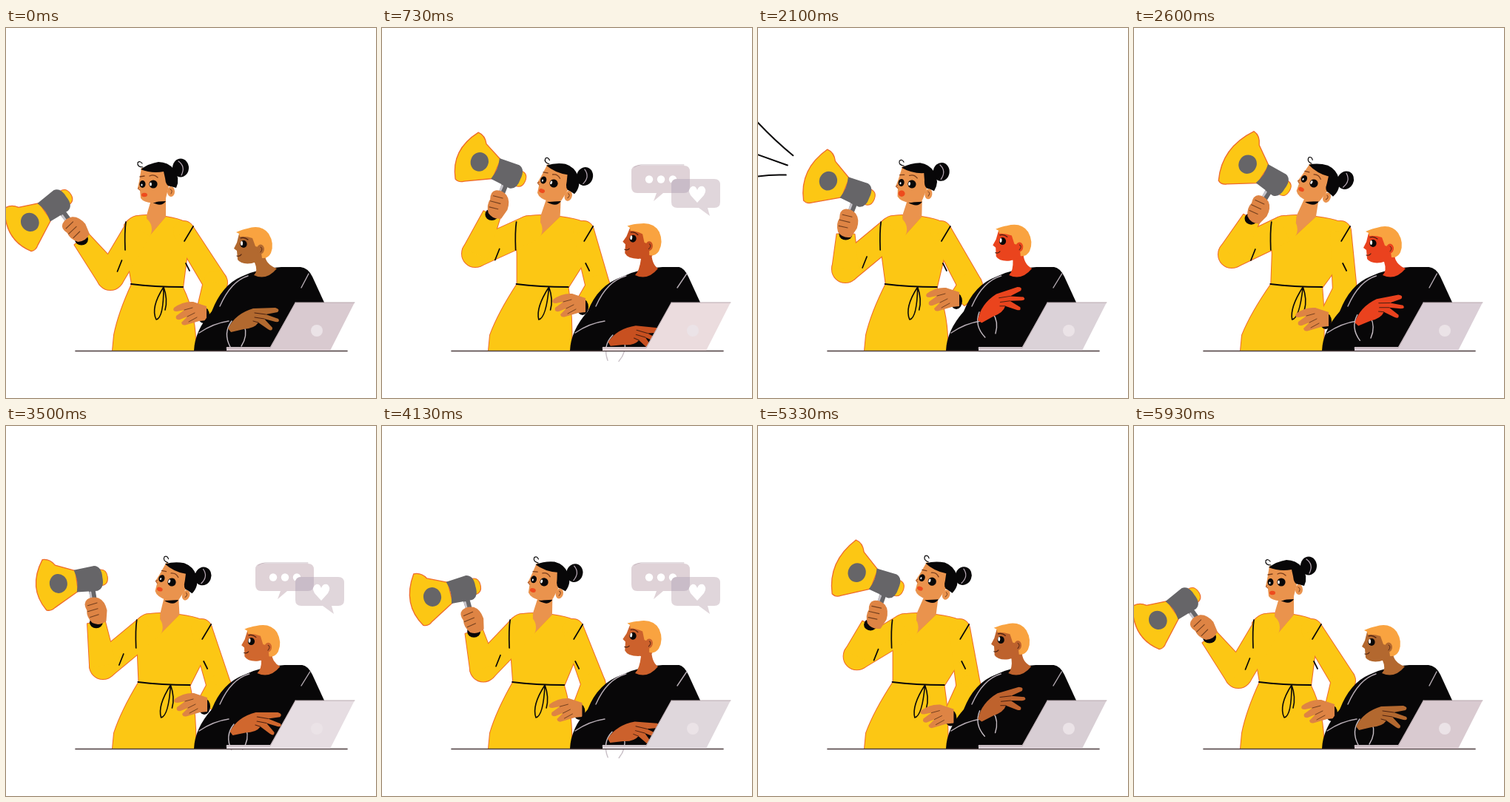
Write an HTML page that moves like this. It is 500 px wide and 500 px high and loops after 6010 ms.

```html
<!DOCTYPE html>
<html lang="en">
<head>
<meta charset="utf-8">
<style>
html, body { margin: 0; width: 100%; height: 100%; overflow: hidden; background: #fff; }
svg { display: block; width: 100vw; height: 100vh; }
</style>
</head>
<body>
<svg id="stage" viewBox="0 0 500 500" fill="none" stroke-linecap="round" stroke-linejoin="round"></svg>
<script>
const LOOP = 6010;
const YELLOW = '#fcc714', GRAY = '#666568', INK = '#080708', EDGE = '#ee6a2c';
const SKIN = '#ea934d', HAND = '#de8444';

const ease = {
  both: u => u * u * (3 - 2 * u),
  in: u => u * u,
  out: u => 1 - (1 - u) * (1 - u),
  flat: u => u
};

// horn x, y, angle, half height | elbow x, y | lean | head x, y, tilt | right hand x, y | right elbow x, y
const LOW   = [20, 271, -35, 35, 141, 336, 0, 199, 211, 0, 249, 385, 283, 344];
const UP    = [118, 175, 23, 36, 126, 305, 28, 232, 210, 18, 253, 374, 292, 350];
const SIDE  = [107, 186, 21, 40, 122, 317, 13, 215, 211, 12, 250, 360, 288, 347];
const LEFT  = [81, 201, 22, 39, 118, 326, 6, 208, 211, 8, 250, 366, 287, 348];
const HIGH  = [141, 176, 33, 42, 132, 306, 34, 243, 210, 25, 241, 393, 285, 355];
const DOWN  = [56, 215, -8, 35, 131, 324, 21, 224, 211, 20, 250, 376, 288, 352];
const LOWER = [35, 247, -24, 35, 138, 332, 12, 214, 211, 12, 250, 381, 286, 348];

const womanKeys = [
  [0, LOW], [670, UP, 'both'], [1270, UP], [1500, SIDE, 'in'], [1850, LEFT, 'out'], [2230, LEFT],
  [2580, HIGH, 'both'], [3160, HIGH], [3500, DOWN, 'in'], [3780, LOWER, 'out'], [3960, LOWER],
  [4600, HIGH, 'both'], [5140, HIGH], [5850, LOW, 'both'], [LOOP, LOW]
];

// head x, y, tilt | hand x, y, turn
const manRest = [0, 0, 0, 334, 393, 0];
const manKeys = [
  [0, manRest], [500, [9, 0, 3, 337, 401, 2], 'both'], [730, [14, -5, 8, 341, 416, 8], 'both'],
  [1250, [14, -6, 8, 340, 413, 6], 'both'], [1500, [13, -5, 7, 335, 392, 0], 'both'],
  [1720, [12, -5, 4, 326, 372, -18], 'both'], [2200, [8, -3, 2, 326, 373, -16], 'both'],
  [2600, [2, -1, 0, 330, 380, -9], 'both'], [2930, manRest, 'both'], [3010, manRest]
];

const toneKeys = [
  [0, [178, 105, 47, 217, 202, 208]], [730, [200, 80, 32, 235, 220, 222], 'flat'],
  [1500, [234, 70, 28, 220, 215, 218], 'flat'], [2600, [234, 66, 30, 218, 206, 214], 'flat'],
  [3500, [208, 103, 46, 230, 221, 226], 'flat'], [4700, [201, 91, 43, 216, 209, 215], 'flat'],
  [LOOP, [178, 105, 47, 217, 202, 208], 'flat']
];

function sample(keys, t) {
  const i = Math.max(1, keys.findIndex(k => k[0] > t));
  const [t0, a] = keys[i - 1], [t1, b, mode = 'both'] = keys[i];
  const u = ease[mode]((t - t0) / (t1 - t0));
  return a.map((v, n) => v + (b[n] - v) * u);
}

const ramp = (t, from, to) => Math.min(1, Math.max(0, (t - from) / (to - from)));
const rgb = c => `rgb(${c.map(Math.round)})`;
const shape = (d, fill, extra = '') => `<path d="${d}" fill="${fill}" ${extra}/>`;
const line = (d, color = INK, w = 1.7) => `<path d="${d}" stroke="${color}" stroke-width="${w}"/>`;
const oval = (x, y, rx, ry, fill) => `<ellipse cx="${x}" cy="${y}" rx="${rx}" ry="${ry}" fill="${fill}"/>`;
const group = (transform, body) => `<g transform="${transform}">${body}</g>`;
const spin = (x, y, deg) => {
  const a = deg * Math.PI / 180, c = Math.cos(a), s = Math.sin(a);
  return [x * c - y * s, x * s + y * c];
};

const disc = (x, y, r) => `M${x - r} ${y}a${r} ${r} 0 1 0 ${2 * r} 0a${r} ${r} 0 1 0 ${-2 * r} 0Z`;
function taper([x0, y0, r0], [x1, y1, r1]) {
  const len = Math.hypot(x1 - x0, y1 - y0), nx = (y0 - y1) / len, ny = (x1 - x0) / len;
  return `M${x0 + nx * r0} ${y0 + ny * r0}L${x1 + nx * r1} ${y1 + ny * r1}` +
    `L${x1 - nx * r1} ${y1 - ny * r1}L${x0 - nx * r0} ${y0 - ny * r0}Z`;
}
const limb = (a, b, c) => [disc(...a), taper(a, b), disc(...b), taper(b, c)];

function shout(t) {
  const start = [760, 1950, 2640, 4600].find(s => t >= s && t < s + (s === 1950 ? 330 : 500));
  if (start === undefined) return '';
  const u = (t - start) / (start === 1950 ? 330 : 500);
  const outer = 0.3 + 0.9 * ease.out(ramp(u, 0, .45)), inner = 1.15 * ease.in(ramp(u, .45, 1));
  return [[-42, -14, -58, -23, 3], [-44, 1, -71, 3, 0], [-41, 14, -59, 34, -8]].map(([x, y, dx, dy, bend]) => {
    const m = (inner + outer) / 2;
    return line(`M${x + dx * inner} ${y + dy * inner}Q${x + dx * m} ${y + dy * m + bend} ${x + dx * outer} ${y + dy * outer}`, INK, 2);
  }).join('');
}

function megaphone(x, y, angle, h, t) {
  const bell = `M-2 ${-h}Q8 ${-h} 14 ${-h * .72}L40 -14V14L6 ${h * .9}Q0 ${h + 1} -6 ${h * .95}Q-27 0 -2 ${-h}Z`;
  return group(`translate(${x} ${y}) rotate(${angle})`,
    shape('M54 12H63L64 57H57Z', GRAY) + line('M56 18V40', '#c5c2c8', 3) +
    shape('M72 -11Q82 -11 82 0Q82 11 72 11Z', YELLOW, `stroke="${EDGE}"`) +
    shape(bell, YELLOW, `stroke="${EDGE}" stroke-width="1.3"`) +
    shape('M38 -15L66 -17Q76 -15 75 0Q76 15 66 17L38 15Q43 0 38 -15Z', GRAY) +
    oval(15, 0, 12, 13, GRAY) + shout(t) +
    shape('M50 27Q57 23 66 27Q74 32 75 45L72 59Q62 65 53 59Q46 50 48 41Q44 31 50 27Z', HAND) +
    line('M50 35L63 33M49 43L63 41M51 51L63 49', '#74401f', 1.1));
}

function womanHead(x, y, tilt, t) {
  const blink = t > 4640 && t < 4800, loud = shout(t) !== '';
  const eyes = blink
    ? line('M-18 1Q-15 4 -11 1M-6 1Q0 5 6 0', INK, 2)
    : oval(-14.5, 0, 4, 5, INK) + oval(0, 0, 5.6, 5.6, INK) + oval(-15.5, 1, 1, 1.5, '#fff') + oval(-3.5, 0, 1.4, 2.5, '#fff');
  return group(`translate(${x} ${y}) rotate(${tilt})`,
    oval(37, -22, 11, 12.5, INK) + line('M34 -31Q44 -24 38 -12', '#b8a9b6', 1.2) +
    shape('M-16 -22L-19 -4L-21 5L-18 9L-17 19Q-12 26 2 25L17 19L23 -6L16 -22Z', SKIN) +
    oval(24, 10, 5, 7, SKIN) + line('M23 7Q27 8 24 13', '#7c421f', 1) +
    shape('M-17 -20Q-6 -28 7 -30Q20 -30 28 -20Q37 -8 31 5L24 3Q17 4 16 -8L14 -17Q-2 -14 -17 -20Z', INK) +
    line('M-14 -23Q-22 -23 -21 -29Q-18 -32 -15 -28', INK, 1.2) +
    line('M-18 -10L-12 -11M-5 -11Q1 -14 6 -9', '#7a3e1c', 1.3) +
    eyes + line('M-19 4L-21 6L-18 8', '#a95628', 1) +
    oval(-12, 14.5, loud ? 4.5 : 4, loud ? 4.2 : 2.8, '#ee4b1d'));
}

function woman(p, t) {
  const [hx, hy, angle, h, ex, ey, lean, x, y, tilt, rx, ry, qx, qy] = p;
  const sl = 160 + .7 * lean, sr = 252 + 1.15 * lean, w = .45 * lean, c = 203 + .88 * lean, tip = 193 + .7 * lean;
  const [gx, gy] = spin(58, 43, angle), fist = [hx + gx, hy + gy];
  const d = Math.hypot(ex - fist[0], ey - fist[1]);
  const wrist = [fist[0] + (ex - fist[0]) * 16 / d, fist[1] + (ey - fist[1]) * 16 / d];
  const cuff = [rx + 20, ry + 1];
  const torso = `M${c - 13} 253Q${sl + 8} 253 ${sl} 266L${sl + 3} 305L${170 + w} 346Q${152 + w * .4} 385 146 415L144 436H256` +
    `Q258 390 ${239 + w} 351L${sr - 8} 312L${sr} 274Q${sr - 2} 260 ${c + 13} 255L${tip} 282Z`;
  const cloth = [torso,
    ...limb([sl + 19, 272, 18], [ex, ey, 18], [...wrist, 12]),
    ...limb([sr - 12, 275, 14], [qx, qy, 16], [...cuff, 12])];
  const [nx, ny] = spin(7, 22, tilt);
  const midX = (sl + 10 + ex) / 2, midY = (272 + ey) / 2;
  return cloth.map(s => shape(s, YELLOW, `stroke="${EDGE}" stroke-width="2"`)).join('') +
    shape(`M${x + nx - 9} ${y + ny - 4}L${x + nx + 10} ${y + ny - 5}L${c + 13} 255L${tip} 282L${c - 13} 253Z`, SKIN) +
    cloth.map(s => shape(s, YELLOW)).join('') +
    shape(`M${x + nx - 9} ${y + ny + 2}L${x + nx + 10} ${y + ny + 1}Q${x + nx + 4} ${y + ny + 10} ${x + nx - 9} ${y + ny + 2}Z`, INK) +
    womanHead(x, y, tilt, t) +
    line(`M${sl + 2} 262Q${sl} 275 ${sl + 1} 300M${sr + 1} 268L${sr - 11} 288`) +
    line(`M${midX + 1} ${midY + 10}L${midX - 5} ${midY + 25}`) +
    line(`M${sr - 9} 318L${sr - 4} 328`) +
    line(`M${169 + w} 346Q${200 + w} 350 ${239 + w} 350`, INK, 2) +
    line(`M${213 + w} 350Q${195 + w} 378 ${203 + w * .7} 394Q${213 + w * .7} 392 ${213 + w} 350Q${219 + w} 367 ${215 + w} 381`, INK, 1.6) +
    oval(wrist[0], wrist[1], 9, 8, INK) +
    megaphone(hx, hy, angle, h, t) +
    oval(cuff[0] - 2, cuff[1] + 2, 8, 11, INK) +
    group(`translate(${rx} ${ry})`,
      shape('M22 -9L4 -15Q-10 -16 -22 -7Q-25 -2 -18 -2L-8 -4L-19 4Q-21 10 -14 9L-4 5L-12 13Q-11 18 -5 16L12 11L22 10Z', HAND) +
      line('M-8 -4L3 -7M-4 5L6 0M-2 12L9 6', '#74401f', 1));
}

function man([hx, hy, tilt, px, py, turn], skin) {
  const k = hx * .5;
  const head =
    shape('M315 278L312 290L308 298L312 301L313 313Q318 320 332 318L350 312L353 282Z', skin) +
    shape('M311 276Q320 272 326 271Q345 265 355 278Q363 291 358 304Q354 312 346 311L344 297L337 295L333 284Q324 281 316 282L315 278Z', '#f9a340') +
    oval(344, 299, 5, 6.5, skin) + line('M344 296Q348 298 344 303', '#5b2b17', 1) +
    oval(321, 292, 4.6, 5, INK) + oval(318.5, 291, 1.5, 3, '#fff') +
    line('M317 284Q322 282 327 286M312 308Q316 309 318 306', '#4a2010', 1.2);
  return shape(`M254 436Q255 409 278 383Q292 347 ${318 + k} 336Q${340 + k} 325 ${372 + k} 323H${398 + k * .5}Q408 324 414 336L431 373L430 436Z`, INK) +
    shape(`M${326 + hx} ${312 + hy}L${350 + hx} ${306 + hy}Q${350 + hx} 319 ${366 + k} 325Q${352 + k} 342 ${335 + k} 334Q${341 + k} 328 ${336 + hx} ${317 + hy}Z`, skin) +
    group(`translate(${hx} ${hy}) rotate(${tilt} 340 320)`, head) +
    line(`M${327 + k * .4} 335Q304 342 289 376M${409 + k * .4} 332L399 351M261 412Q280 399 301 396`, '#b7adb5', 1.4) +
    group(`translate(${px} ${py}) rotate(${turn})`,
      line('M-29 3Q-41 19 -31 38M-12 9Q-7 23 -16 37', '#c7bec5', 1.4) +
      shape('M-34 13Q-24 -7 0 -14L30 -15Q37 -13 33 -9L17 -6L34 0Q37 5 30 4L15 0L26 12Q26 18 20 14L7 5Q2 13 -13 14L-30 18Z', skin) +
      line('M2 -8L17 -6M2 -2L15 0M0 3L7 5', '#4a2010', 1));
}

function bubbles(t) {
  const size = (a, b, c, d) => ease.both(ramp(t, a, b)) * (1 - ease.both(ramp(t, c, d)));
  const one = size(150, 350, 1560, 1760), two = size(250, 450, 1760, 1960);
  const pop = (x, y, s, body) => s > .01 ? group(`translate(${x} ${y}) scale(${s}) translate(${-x} ${-y})`, body) : '';
  return pop(370, 230, one,
      shape('M345 186H408Q416 186 416 194V214Q416 223 408 223H380L367 234L371 223H345Q337 223 337 214V194Q337 186 345 186Z', '#dfd2d7') +
      line('M341 188Q345 185 350 185H408', '#c6b8bf', 1) +
      [361, 377, 393].map(x => oval(x, 204.5, 5.2, 5.2, '#fff')).join('')) +
    pop(430, 235, two,
      shape('M399 204H449Q457 204 457 212V235Q457 243 449 243H440L443 254L428 243H399Q391 243 391 235V212Q391 204 399 204Z', '#e0d6db') +
      (one > .9 ? shape('M399 204H416V214Q416 223 408 223H391V212Q391 204 399 204Z', '#c9bcc8') : '') +
      shape('M426 236L417 226Q412 218 419 214Q424 213 426 219Q428 213 434 214Q440 218 435 226Z', '#fff'));
}

function draw(t) {
  const tone = sample(toneKeys, t), skin = rgb(tone.slice(0, 3)), metal = rgb(tone.slice(3));
  const beat = t % 3000;
  return bubbles(beat) +
    woman(sample(womanKeys, t), t) +
    man(sample(manKeys, beat), skin) +
    line('M94 436.5H461', '#4b3c3e', 1.6) +
    shape('M391 371H471L438 436H298V431H357Z', metal) +
    line('M391 371H471M298 432.5H357L391 371', '#b9a9af', 1) +
    oval(420, 409, 8, 8, '#ebe3e7');
}

const stage = document.getElementById('stage');
const began = performance.now();
function tick() {
  const t = (performance.now() - began) % LOOP;
  // The picture advances in alternating steps of 30 and 70 ms.
  const step = Math.min(5930, Math.floor(t / 100) * 100 + (t % 100 < 30 ? 0 : 30));
  stage.innerHTML = draw(step);
  requestAnimationFrame(tick);
}
tick();
</script>
</body>
</html>
```
